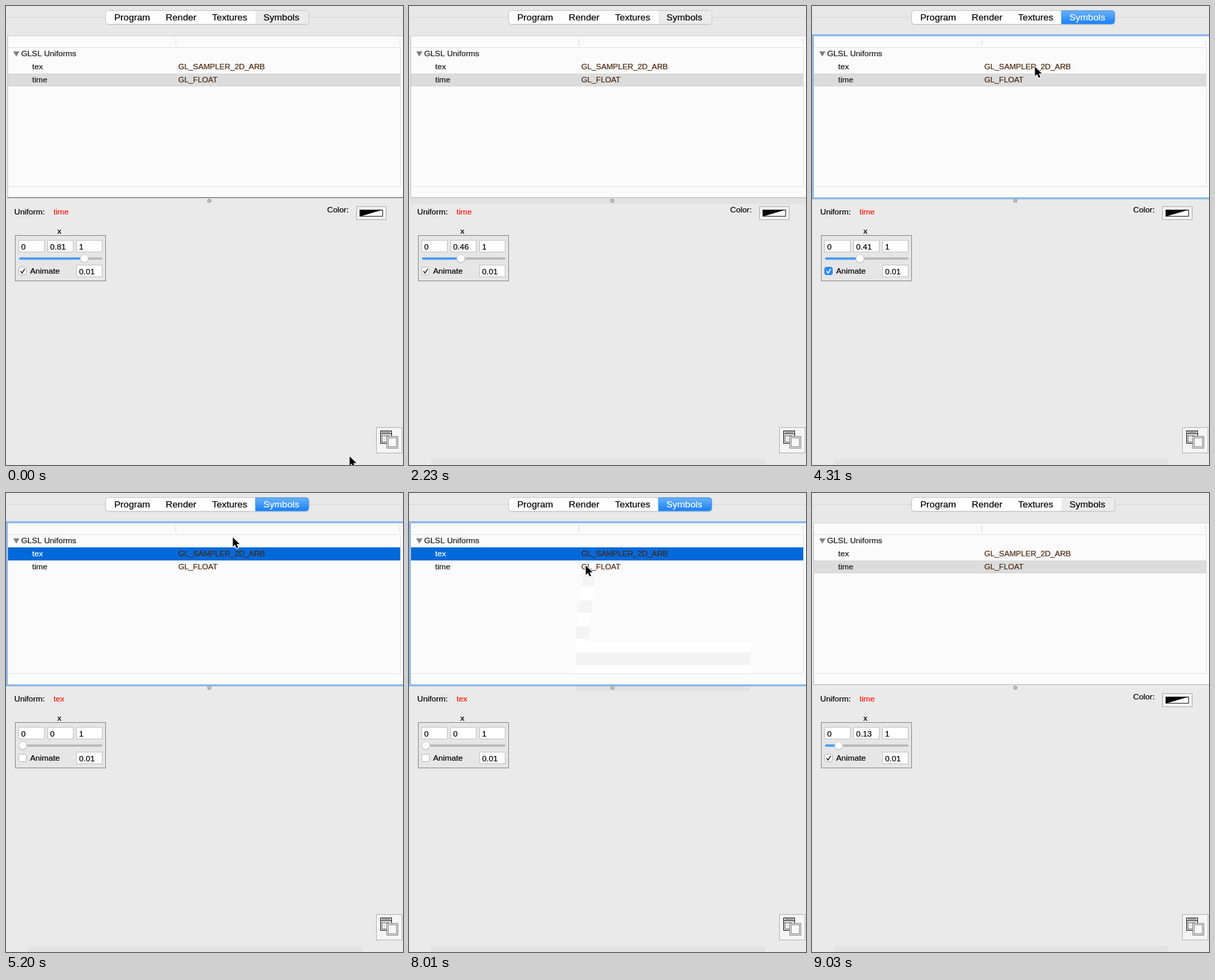
These frames come from a looping animation (576 by 667 pixels, 9130 ms). An HTML page with a canvas:

```html
<!DOCTYPE html>
<html>
<head>
<meta charset="utf-8">
<style>
  html, body { margin: 0; width: 576px; height: 667px; overflow: hidden; background: #eaeaea; }
  canvas { display: block; }
</style>
</head>
<body>
<canvas id="stage" width="576" height="667"></canvas>
<script>
const ctx = document.getElementById('stage').getContext('2d');
const LOOP = 9130, TICK = 148.1;

// Ticks at which the interface changes state
const DIVIDER = 1, ACTIVATE = 28, PICK_TEX = 34, TRAIL = 40, PICK_TIME = 55, DEACTIVATE = 59;

// Pointer strokes through key points [tick, x, y]; hidden between strokes
const strokes = [
  [[0, 498, 653], [11, 498, 653]],
  [[25, 331, 9], [27, 323, 87], [34, 323, 87], [36, 334, 39], [39, 398, 226], [40, 449, 352], [41, 480, 425]],
  [[45, 545, 655], [46, 538, 642]],
  [[49, 482, 561], [50, 242, 218], [54, 256, 104], [56, 256, 104], [58, 420, 560]]
];

// Distance travelled by the animated value: [tick, distance]
const travel = [[0, .19], [7, .79], [22, 2.05], [29, 2.59], [61, 5.13]];

// Interpolates key points; null outside their range
function track(points, n) {
  const k = points.findIndex(p => p[0] >= n);
  if (k < 0 || n < points[0][0]) return null;
  const b = points[k], a = points[k - 1] || b;
  const f = a === b ? 0 : (n - a[0]) / (b[0] - a[0]);
  return b.slice(1).map((v, j) => a[j + 1] + (v - a[j + 1]) * f);
}

function pointerAt(n) {
  return strokes.map(s => track(s, n)).find(Boolean);
}

// The value bounces between 1 and 0
function valueAt(n) {
  return Math.abs(1 - track(travel, n)[0] % 2);
}

function rect(x, y, w, h, fill) {
  ctx.fillStyle = fill;
  ctx.fillRect(x, y, w, h);
}

function frame(x, y, w, h, fill, line) {
  rect(x, y, w, h, line);
  rect(x + 1, y + 1, w - 2, h - 2, fill);
}

function rounded(x, y, w, h, r, fill, line) {
  ctx.beginPath();
  ctx.roundRect(x, y, w, h, r);
  ctx.fillStyle = fill;
  ctx.fill();
  if (line) { ctx.strokeStyle = line; ctx.lineWidth = 1; ctx.stroke(); }
}

function disc(x, y, r, fill, line) {
  rounded(x - r, y - r, 2 * r, 2 * r, r, fill, line);
}

function poly(points, fill) {
  ctx.beginPath();
  points.forEach(([x, y]) => ctx.lineTo(x, y));
  ctx.closePath();
  ctx.fillStyle = fill;
  ctx.fill();
}

function text(s, x, y, fill = '#000', size = 11.7, align = 'left') {
  ctx.font = size + 'px "Liberation Sans", Arial, sans-serif';
  ctx.textAlign = align;
  ctx.fillStyle = ctx.strokeStyle = fill;
  ctx.lineWidth = .2;
  ctx.fillText(s, x, y);
  ctx.strokeText(s, x, y);
}

function shade(y0, y1, a, b) {
  const g = ctx.createLinearGradient(0, y0, 0, y1);
  g.addColorStop(0, a);
  g.addColorStop(1, b);
  return g;
}

function tabs(active) {
  rect(0, 16, 576, 1, '#d9d9d9');
  rounded(144.5, 7.5, 295, 20, 4, '#d0d0d0');
  rounded(144.5, 6.5, 295, 20, 4, '#fff', '#c9c9c9');
  rounded(362, 7, 77, 19, [0, 4, 4, 0],
    active ? shade(6, 27, '#6db5fb', '#157cf9') : '#ebebeb', active && '#3d92ec');
  [['Program', 183], ['Render', 254], ['Textures', 324.5], ['Symbols', 399.5]].forEach(([s, x], k) =>
    text(s, x, 21, active && k === 3 ? '#fff' : '#000', 13.5, 'center'));
}

// The striped rows show wherever the pointer has lately passed
function stripes(n) {
  for (let k = TRAIL; k <= n; k++) {
    const a = pointerAt(k - 1), b = pointerAt(k);
    if (!a || !b) continue;
    const x = Math.min(a[0], b[0]), y = Math.min(a[1], b[1]);
    ctx.save();
    ctx.beginPath();
    ctx.rect(x, y, Math.abs(a[0] - b[0]) + 13, Math.abs(a[1] - b[1]) + 19);
    ctx.clip();
    rect(3, 118, 569, 144, '#fff');
    for (let row = 118; row < 262; row += 38) rect(3, row, 569, 18, '#f4f4f4');
    rect(2, 279, 574, 9, '#e2e2e2');
    ctx.restore();
  }
}

function table(n, active, tex) {
  rect(2, 43, 574, 235, '#fbfbfb');
  rect(2, 43, 574, 1, '#d6d6d6');
  rect(2, 43, 1, 235, '#c4c4c4');
  rect(3, 60, 570, 1, '#e4e4e4');
  rect(246, 47, 1, 10, '#dedede');
  rect(571, 47, 1, 10, '#dedede');

  if (n >= DIVIDER && n < ACTIVATE) rect(2, 279, 574, 9, '#e2e2e2');
  rect(2, 278, 574, 1, n < DIVIDER ? '#606060' : '#b9b9b9');
  if (active) stripes(n);
  rect(3, 262, 570, 1, '#e4e4e4');
  rect(572, 61, 1, 202, '#e4e4e4');

  const focused = active && n >= PICK_TEX;
  rect(3, tex ? 79 : 98, 569, 19, focused ? '#0069d9' : '#dcdcdc');
  poly([[10.5, 66], [19.5, 66], [15, 73.5]], '#808080');
  text('GLSL Uniforms', 22, 72.5, '#1c1c1c');
  text('tex', 38, 91.5, focused && tex ? '#fff' : '#1c1c1c');
  text('time', 38, 110.5, focused && !tex ? '#fff' : '#1c1c1c');
  text('GL_SAMPLER_2D_ARB', 250, 91.5, '#4a2a14', 11.3);
  text('GL_FLOAT', 250, 110.5, '#4a2a14', 11.3);

  if (active) {
    ctx.strokeStyle = '#8ebae9';
    ctx.lineWidth = 3;
    ctx.strokeRect(.5, 42.5, 600, 237);
  }
  disc(295, 283, 2.6, '#bdbdbd', '#a2a2a2');
}

function field(s, x, y) {
  frame(x, y, 38, 18, '#fff', '#c6c6c6');
  text(s, x + 4, y + 14);
}

function checkbox(on, blue) {
  rounded(18.5, 379.5, 11, 11, 2.5, blue ? '#2f8df9' : '#fff', blue ? '#2a80e8' : '#bbb');
  if (!on) return;
  ctx.beginPath();
  ctx.moveTo(21, 385.3);
  ctx.lineTo(23.3, 388);
  ctx.lineTo(27.2, 381.8);
  ctx.strokeStyle = blue ? '#fff' : '#222';
  ctx.lineWidth = 1.4;
  ctx.stroke();
}

function colorWell() {
  text('Color:', 466, 299.5);
  frame(508, 291, 44, 20, '#f4f4f4', '#b2b2b2');
  frame(513, 296, 34, 10, '#fff', '#333');
  poly([[513, 296], [547, 296], [513, 306]], '#000');
}

function controls(n, active, tex) {
  const v = tex ? 0 : valueAt(n), x = 24.5 + 110 * v;
  text('Uniform:', 12, 302.5);
  text(tex ? 'tex' : 'time', 69, 302.5, '#fc1c0c');
  text('x', 77.5, 330.5, '#000', 11.7, 'center');
  frame(13, 333, 132, 67, '#e6e6e6', '#909090');
  field('0', 18, 340);
  field(String(+v.toFixed(2)), 60, 340);
  field('1', 102, 340);
  field('0.01', 102, 376);
  text('Animate', 35, 388.5);

  rounded(19, 365.5, 121, 3, 1.5, '#b5b5b5');
  if (!tex) rounded(19, 365.5, x - 19, 3, 1.5, '#3b99fc');
  disc(x, 367.7, 6, '#bcbcbc');
  disc(x, 367, 5.7, '#fff', '#d0d0d0');
  checkbox(!tex, active && !tex);
  if (!tex) colorWell();
}

function iconButton() {
  frame(537, 612, 38, 38, '#f5f5f5', '#b8b8b8');
  frame(543, 617, 17, 19, '#e8e8e8', '#222');
  rect(544, 621, 15, 1, '#222');
  ctx.lineWidth = 1;
  ctx.strokeStyle = '#444';
  ctx.setLineDash([2, 1]);
  ctx.strokeRect(545.5, 619.5, 12, 0);
  ctx.strokeRect(545.5, 624.5, 10, 9);
  rect(552, 625, 17, 18, '#f8f8f8');
  ctx.setLineDash([1, 1]);
  ctx.strokeStyle = '#111';
  ctx.strokeRect(552.5, 625.5, 16, 17);
  ctx.strokeRect(554.5, 627.5, 12, 13);
  ctx.setLineDash([]);
}

function arrow(n) {
  const place = pointerAt(n);
  if (!place) return;
  const shape = [[.5, 1.5], [.5, 15], [3.7, 12], [6, 17.3], [8.3, 16.3], [6.1, 11.2], [10.5, 11.2]];
  ctx.save();
  ctx.translate(...place);
  poly(shape, '#000');
  ctx.strokeStyle = '#fff';
  ctx.lineWidth = 1.8;
  ctx.lineJoin = 'round';
  ctx.stroke();
  poly(shape, '#000');
  ctx.restore();
}

function draw(now) {
  const n = Math.floor((now % LOOP + 6) / TICK);
  const active = n >= ACTIVATE && n < DEACTIVATE;
  const tex = n >= PICK_TEX && n < PICK_TIME;
  rect(0, 0, 576, 667, '#eaeaea');
  rect(0, 0, 576, 43, '#e8e8e8');
  if (n >= 12) rect(32, 658, 485, 9, '#e3e3e3');
  tabs(active);
  table(n, active, tex);
  controls(n, active, tex);
  iconButton();
  arrow(n);
}

const start = performance.now();
function loop() {
  draw(performance.now() - start);
  requestAnimationFrame(loop);
}
loop();
</script>
</body>
</html>
```
